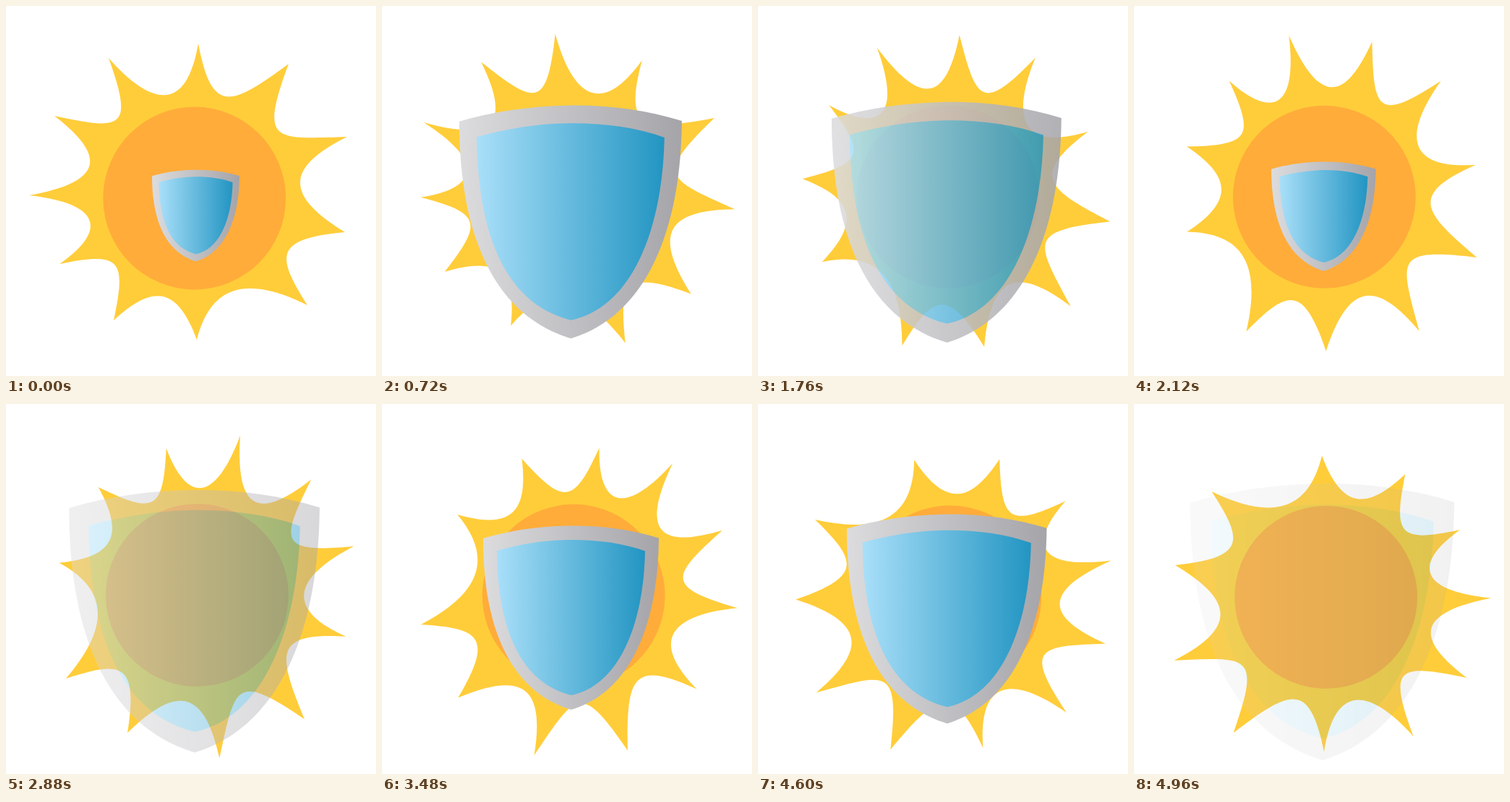
Animation, 512 px wide and 512 px high, one loop 5 s. Source, as an HTML page:

```html
<!DOCTYPE html>
<html lang="en">
<head>
<meta charset="utf-8">
<title>Sun and shield</title>
<style>
  html, body { margin: 0; width: 100%; height: 100%; overflow: hidden; background: #fff; }
  svg { display: block; width: 100%; height: 100%; }
</style>
</head>
<body>
<svg viewBox="0 0 512 512">
  <defs>
    <linearGradient id="silver">
      <stop offset="0" stop-color="#dcdcde"/>
      <stop offset="1" stop-color="#a5a4a9"/>
    </linearGradient>
    <linearGradient id="blue">
      <stop offset="0" stop-color="#a9dff9"/>
      <stop offset="1" stop-color="#2295c2"/>
    </linearGradient>
  </defs>
  <g id="sun">
    <path fill="#ffcd3a" d="M266 52
      C285 150 310 140 391 80
      C351 190 369 184 472 181
      C386 224 386 262 469 313
      C370 322 374 346 417 414
      C340 376 285 380 264 462
      C236 384 200 388 149 435
      C167 350 159 340 74 357
      C136 314 138 274 32 262
      C142 242 134 204 67 152
      C160 172 178 172 142 72
      C203 141 250 146 266 52Z"/>
    <circle cx="260.8" cy="266" r="126.4" fill="#ffac3a"/>
  </g>
  <g id="shield">
    <path fill="url(#silver)" d="M140 186
      C180 174 225 168.5 266 168.5 C306 168.5 346 174 383 185.5
      C382 305 344 398 262 423 C178 398 140 310 140 186Z"/>
    <path fill="url(#blue)" d="M159 203
      C195 193 230 188 264 188 C300 188 335 193 364 203.5
      C362 305 328 389 262 403 C192 386 160 312 159 203Z"/>
  </g>
</svg>
<script>
  const LOOP = 5000, STEP = 40, PULSE = 1000, FADE_START = 0.72;
  const DEGREES_PER_MS = 0.03615, SHIELD_WIDTH = 243;
  const sun = document.getElementById('sun');
  const shield = document.getElementById('shield');

  // Shield width over one pulse: nearly linear growth with a soft start.
  const widthAt = p => 121 + 254 * p + p * (1 - p) * (-98 + 290 * p - 175 * p * p);

  function draw(now) {
    const time = Math.floor((now % LOOP) / STEP) * STEP;
    const pulse = (time % PULSE) / PULSE;
    const scale = widthAt(pulse) / SHIELD_WIDTH;

    sun.setAttribute('transform', `rotate(${time * DEGREES_PER_MS} 263.2 266.7)`);
    shield.setAttribute('transform',
      `translate(263.6 284.3) scale(${scale}) translate(-263.6 -284.3)`);
    shield.setAttribute('opacity', Math.min(1, (1 - pulse) / (1 - FADE_START)));
    requestAnimationFrame(draw);
  }
  draw(performance.now());
</script>
</body>
</html>
```
